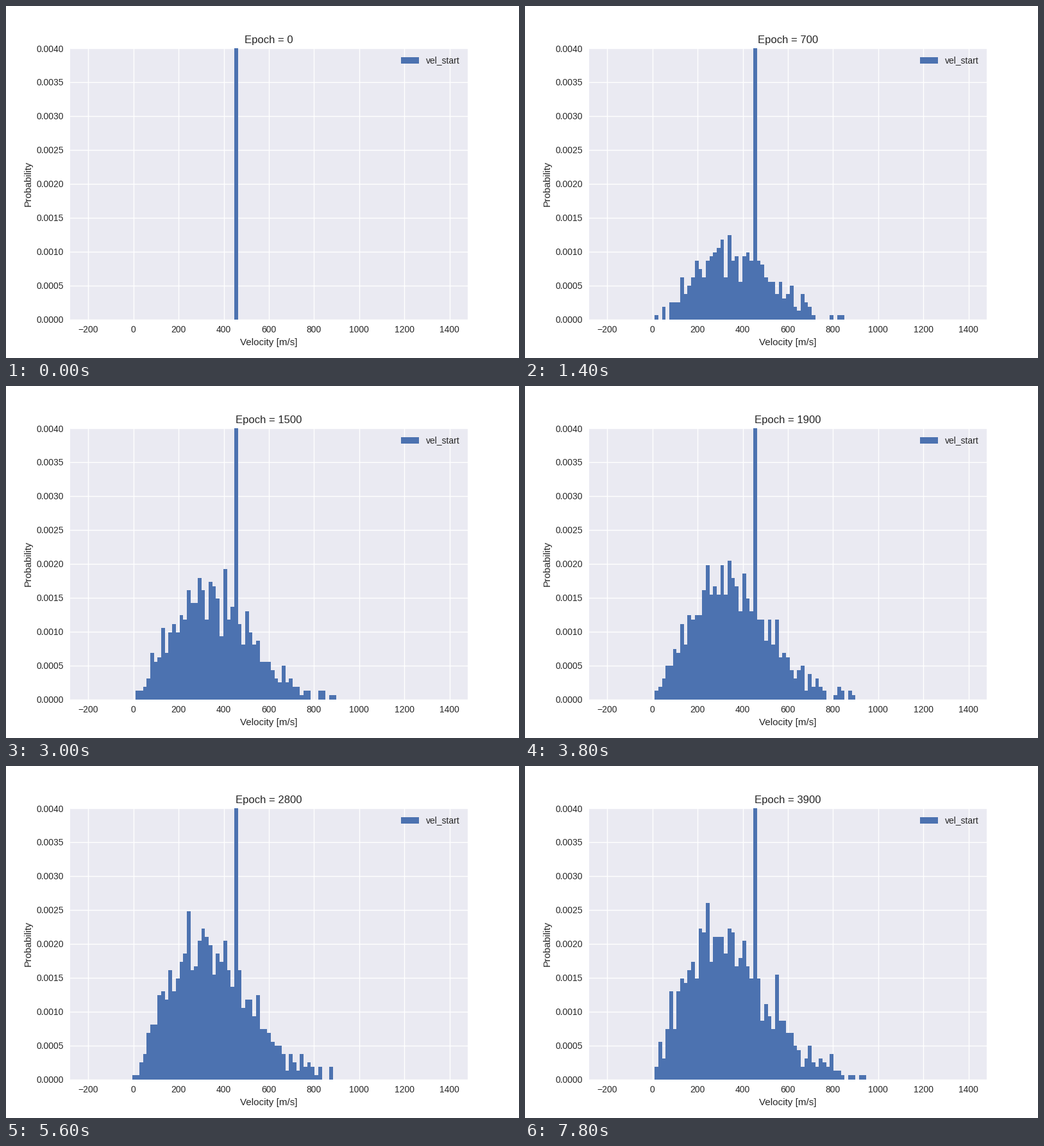
A matplotlib script for the animation above (8 s loop, 800 by 550 pixels).

```python
import numpy as np
import matplotlib.pyplot as plt
from matplotlib.animation import FuncAnimation

plt.style.use("seaborn-v0_8")
plt.rcParams["font.family"] = "Liberation Sans"

FRAMES, STEP_MS, EPOCHS_PER_FRAME = 40, 200, 100
PARTICLES = 1000
START_SPEED = 450
HIT_EPOCHS = 1350    # mean time between collisions of one particle
EDGES = np.linspace(-200, 1400, 100)
WIDTH = EDGES[1] - EDGES[0]


def draw_speeds(count, epoch, rng):
    """Speeds after a collision: bell-shaped early, Rayleigh-like later."""
    early = np.exp(-epoch / 900)
    shape, scale = 2 + 0.8 * early, 395 + 35 * early
    u = 0.997 * (np.arange(count) + rng.random(count)) / max(count, 1)
    return rng.permutation(scale * (-np.log(1 - u)) ** (1 / shape))


def simulate():
    """Histogram densities of the gas, one row per frame."""
    rng = np.random.default_rng(7)
    rank = (np.arange(PARTICLES) + 0.5) / PARTICLES
    first_hit = -HIT_EPOCHS * np.log(1 - rank)
    hit_chance = 1 - np.exp(-EPOCHS_PER_FRAME / HIT_EPOCHS)
    speed = np.full(PARTICLES, float(START_SPEED))
    rows = []
    for i in range(FRAMES):
        epoch = i * EPOCHS_PER_FRAME
        fresh = (first_hit <= epoch) & (first_hit > epoch - EPOCHS_PER_FRAME)
        again = (first_hit <= epoch) & (rng.random(PARTICLES) < hit_chance)
        hit = fresh | again
        speed[hit] = draw_speeds(hit.sum(), epoch, rng)
        rows.append(np.histogram(speed, EDGES, density=True)[0])
    return rows


density = simulate()

fig, ax = plt.subplots(figsize=(8, 5.5), dpi=100)
bars = ax.bar(EDGES[:-1], density[0], WIDTH, align="edge", label="vel_start")
ax.set_xlim(-280, 1480)
ax.set_ylim(0, 0.004)
ax.set_xlabel("Velocity [m/s]")
ax.set_ylabel("Probability")
ax.legend(loc="upper right")
title = ax.set_title("Epoch = 0")


def update(i):
    for bar, h in zip(bars, density[i]):
        bar.set_height(h)
    title.set_text(f"Epoch = {i * EPOCHS_PER_FRAME}")
    return [*bars, title]


anim = FuncAnimation(fig, update, frames=FRAMES, interval=STEP_MS,
                     repeat=True, repeat_delay=0, blit=False)
plt.show()
```
